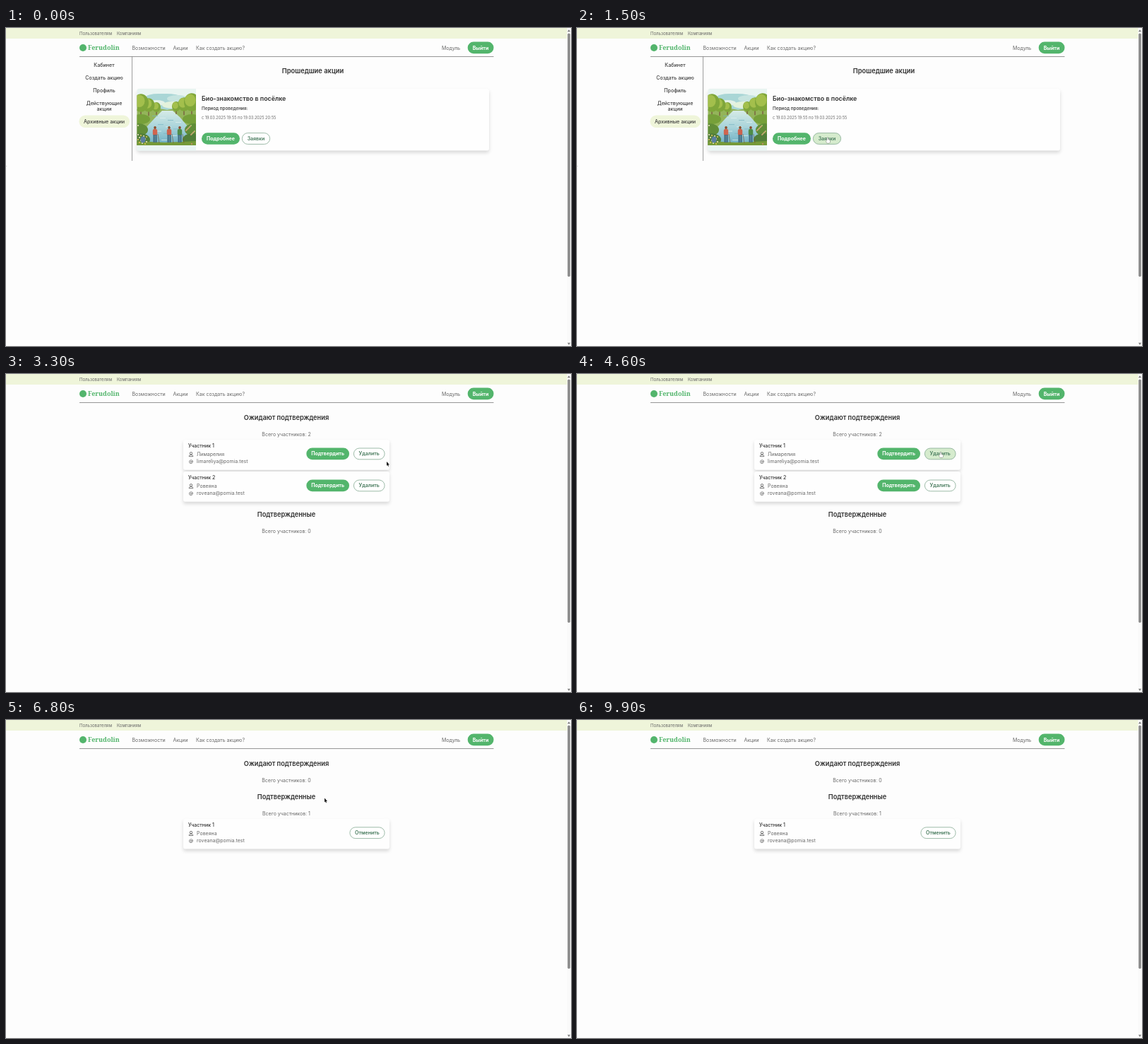
Write an HTML page with a canvas that moves like this. It is 800 px wide and 450 px high and loops after 10 s.

```html
<!DOCTYPE html>
<html lang="ru">
<head>
<meta charset="utf-8">
<title>Заявки участников</title>
<style>
html, body { margin: 0; width: 100%; height: 100%; overflow: hidden; background: #fdfdfd; }
canvas { display: block; width: 800px; height: 450px; }
</style>
</head>
<body>
<canvas id="stage" width="800" height="450"></canvas>
<script>
const ctx = document.getElementById('stage').getContext('2d');
const LOOP = 10000, STEP = 100;
const GREEN = '#53b56c', DARK = '#303030', GREY = '#686868';
const OPEN_LIST = 1700, REMOVE = 4900, CONFIRM = 6300;

const people = [
  { name: 'Лимарелия', mail: 'limareliya@pomia.test' },
  { name: 'Ровеяна', mail: 'roveana@pomia.test' }
];

// time, x, y of the mouse tip
const path = [
  [300, 515, 199], [800, 511, 196], [1100, 511, 196], [1500, 355, 155],
  [1900, 359, 154], [2400, 359, 154], [3100, 539, 124], [3500, 539, 124],
  [4200, 515, 110.5], [5200, 515, 110.5], [5800, 451, 110.5], [6800, 451, 110.5],
  [7500, 478, 245], [8300, 478, 245]
];

let mouse = null, overButton = false;

function mouseAt(t) {
  const i = path.findIndex(p => p[0] > t);
  if (i < 1) return null;
  const [t0, x0, y0] = path[i - 1], [t1, x1, y1] = path[i];
  const k = (t - t0) / (t1 - t0), e = k * k * (3 - 2 * k);
  return { x: x0 + (x1 - x0) * e, y: y0 + (y1 - y0) * e };
}

// y is the middle of the capitals
function text(s, x, y, size, weight = 400, color = GREY, align = 'left') {
  ctx.font = `${weight} ${size}px Inter, sans-serif`;
  ctx.fillStyle = color;
  ctx.textAlign = align;
  ctx.fillText(s, x, y + size * 0.36);
}

function rect(x, y, w, h, color) {
  ctx.fillStyle = color;
  ctx.fillRect(x, y, w, h);
}

function round(x, y, w, h, r, fill, stroke) {
  ctx.beginPath();
  ctx.roundRect(x, y, w, h, r);
  if (fill) { ctx.fillStyle = fill; ctx.fill(); }
  if (stroke) { ctx.strokeStyle = stroke; ctx.lineWidth = 0.8; ctx.stroke(); }
}

function oval(x, y, rx, ry, color) {
  ctx.fillStyle = color;
  ctx.beginPath();
  ctx.ellipse(x, y, rx, ry, 0, 0, Math.PI * 2);
  ctx.fill();
}

function poly(color, ...p) {
  ctx.fillStyle = color;
  ctx.beginPath();
  for (let i = 0; i < p.length; i += 2) ctx.lineTo(p[i], p[i + 1]);
  ctx.closePath();
  ctx.fill();
}

function button(label, x, y, w, solid) {
  const h = 16.6, top = y - h / 2;
  const hover = mouse && mouse.x > x && mouse.x < x + w && mouse.y > top && mouse.y < top + h;
  if (hover) overButton = true;
  if (solid) round(x, top, w, h, h / 2, GREEN);
  else round(x + 0.4, top + 0.4, w - 0.8, h - 0.8, h / 2, hover ? '#d5ebcd' : '#fff', '#84aa92');
  text(label, x + w / 2, y, 7, solid ? 700 : 600, solid ? '#fff' : '#45795b', 'center');
}

function card(x, y, w, h) {
  ctx.save();
  ctx.shadowColor = 'rgba(0,0,0,.15)';
  ctx.shadowBlur = 5;
  ctx.shadowOffsetY = 3;
  round(x, y, w, h, 3, '#fefefe');
  ctx.restore();
}

function chrome() {
  rect(0, 0, 800, 450, '#fdfdfd');
  rect(0, 0, 795, 15, '#eff5da');
  text('Пользователям', 104, 7.6, 6.05);
  text('Компаниям', 157, 7.6, 6.05);

  oval(109, 28, 5, 5, GREEN);
  ctx.font = '700 9px "Noto Serif", serif';
  ctx.textAlign = 'left';
  ctx.fillText('Ferudolin', 116, 31.2);

  text('Возможности', 178.5, 28, 7);
  text('Акции', 236.5, 28, 7);
  text('Как создать акцию?', 269, 28, 7);
  text('Модуль', 617, 28, 7);
  round(653.7, 19.6, 36.8, 16.6, 8.3, GREEN);
  text('Выйти', 672, 28, 7, 700, '#fff', 'center');
  rect(104, 40, 586.5, 0.9, '#8b8b8b');

  rect(794.5, 0, 5.5, 450, '#fafafa');
  round(795.2, 7.5, 3.6, 344.5, 1.8, '#8a8a8a');
  poly('#777', 795, 5.2, 799, 5.2, 797, 2.2);
  poly('#777', 795, 445.4, 799, 445.4, 797, 448.4);
}

function tree(x, y, r) {
  rect(x - 0.8, y + r, 1.6, r * 0.8, '#7d6a42');
  oval(x, y, r, r * 1.15, '#7fa63a');
  oval(x - r * 0.2, y - r * 0.25, r * 0.7, r * 0.8, '#a3bf4c');
}

function angler(x, y, shirt) {
  ctx.strokeStyle = '#76572f';
  ctx.lineWidth = 0.6;
  ctx.beginPath();
  ctx.moveTo(x + 4, y + 9);
  ctx.lineTo(x + 6, y + 22);
  ctx.stroke();
  oval(x, y, 1.8, 2, '#8a4b2b');
  round(x - 3.2, y + 2, 6.4, 9, 2, shirt);
  rect(x - 2.5, y + 10, 2.2, 11, '#416b80');
  rect(x + 0.4, y + 10, 2.2, 11, '#416b80');
}

function riverScene() {
  ctx.save();
  ctx.beginPath();
  ctx.roundRect(185.5, 86, 83.5, 80, [3, 0, 0, 0]);
  ctx.clip();
  rect(185, 86, 84, 80, '#e8f4f1');
  oval(227, 108, 36, 15, '#a9d6d6');
  oval(216, 98, 18, 5, '#a9d6d6');
  oval(243, 100, 15, 5, '#c6e4e0');
  oval(213, 106, 12, 4, '#e3f2e8');
  oval(236, 109, 15, 5, '#e3f2dc');
  poly('#93b45a', 185, 115, 212, 113, 228, 116, 245, 113, 269, 115, 269, 166, 185, 166);

  const water = ctx.createLinearGradient(0, 117, 0, 164);
  water.addColorStop(0, '#d6ebe6');
  water.addColorStop(0.5, '#a8d3da');
  water.addColorStop(1, '#6fb0c4');
  poly(water, 221, 117, 236, 117, 246, 126, 258, 140, 264, 166, 190, 166, 199, 140, 212, 126);
  for (let i = 0; i < 12; i++) {
    rect(207 + i * 11 % 36, 124 + i * 3.1, 8, 0.7, i % 2 ? '#e4f3ef' : '#78b4c2');
  }

  for (let i = 2; i >= 0; i--) {
    const r = 11 - i * 2.5;
    tree(191 + i * 11, 106 + i * 3, r);
    tree(263 - i * 11, 105 + i * 3, r);
  }
  oval(191, 129, 13, 7, '#76a03a');
  oval(263, 129, 13, 7, '#76a03a');
  oval(188, 144, 13, 9, '#618d38');
  oval(266, 144, 13, 9, '#618d38');
  oval(191, 158, 13, 9, '#527f3a');
  oval(263, 158, 13, 9, '#527f3a');
  poly('#759a38', 185, 160, 202, 161, 225, 162, 250, 161, 269, 160, 269, 166, 185, 166);
  for (let i = 0; i < 30; i++) {
    const x = i % 2 ? 255 + i * 7 % 13 : 187 + i * 5 % 14;
    oval(x, 138 + i * 13 % 27, 1, 1, ['#f5e9c5', '#d98a72', '#e6c35a', '#b0cb70'][i % 4]);
  }
  oval(194, 158, 3.5, 4.5, '#5b7fa0');
  angler(211, 141, '#d0654e');
  angler(231, 141, '#cc624d');
  angler(246, 141, '#4f8c48');
  ctx.restore();
}

function archivePage() {
  rect(178.2, 40, 0.8, 148, '#858585');
  round(103.5, 123.5, 71.5, 17.5, 8.7, '#eff5da');
  const side = (s, y) => text(s, 139, y, 7.1, 500, '#3c3c3c', 'center');
  side('Кабинет', 52.5);
  side('Создать акцию', 70.5);
  side('Профиль', 88.5);
  side('Действующие', 106.5);
  side('акции', 114.5);
  side('Архивные акции', 132.3);
  text('.', 0, 194, 6);

  text('Прошедшие акции', 434.5, 60.4, 9.35, 600, DARK, 'center');
  card(185.5, 86, 498.5, 87.5);
  rect(185.5, 165, 83.5, 8.5, '#eaf5f3');
  riverScene();
  text('Био-знакомство в посёлке', 277, 99.3, 8.9, 600, DARK);
  text('Период проведения:', 277, 113.3, 6.3, 600, '#4a4a4a');
  text('с 19.03.2025 19:55 по 19.03.2025 20:55', 277, 127.2, 5.6);
  button('Подробнее', 277, 156.5, 54, true);
  button('Заявки', 334, 156.5, 40);
}

function personIcon(x, y) {
  ctx.strokeStyle = '#555';
  ctx.lineWidth = 0.8;
  ctx.beginPath();
  ctx.arc(x, y - 1.4, 1.7, 0, Math.PI * 2);
  ctx.moveTo(x - 2.8, y + 3);
  ctx.bezierCurveTo(x - 2.8, y - 0.2, x + 2.8, y - 0.2, x + 2.8, y + 3);
  ctx.closePath();
  ctx.stroke();
}

function member(person, number, y, confirmed) {
  card(251, y - 9, 292, 42.8);
  text('Участник ' + number, 258, y, 7, 500, DARK);
  personIcon(262, y + 11.8);
  text(person.name, 270, y + 11.8, 7);
  text('@', 262, y + 21.8, 6.3, 500, '#555', 'center');
  text(person.mail, 270, y + 21.8, 7);
  if (confirmed) {
    button('Отменить', 486.5, y + 11, 50);
  } else {
    button('Подтвердить', 425.3, y + 11, 60.7, true);
    button('Удалить', 492, y + 11, 44.5);
  }
}

function section(title, list, y, confirmed) {
  text(title, 397, y, 9.25, 600, DARK, 'center');
  text('Всего участников: ' + list.length, 397, y + 23.2, 7, 400, GREY, 'center');
  list.forEach((p, i) => member(p, i + 1, y + 39.8 + i * 45, confirmed));
}

function membersPage(t) {
  const waiting = t < REMOVE ? people : t < CONFIRM ? [people[1]] : [];
  const accepted = t < CONFIRM ? [] : [people[1]];
  section('Ожидают подтверждения', waiting, 62.1, false);
  section('Подтвержденные', accepted, 108.9 + waiting.length * 45, true);
}

function drawMouse() {
  if (!mouse) return;
  ctx.save();
  ctx.translate(mouse.x, mouse.y);
  ctx.lineWidth = 0.7;
  ctx.beginPath();
  if (overButton) {
    ctx.roundRect(-0.7, 0, 1.5, 5, 0.7);
    ctx.roundRect(-1.8, 3.2, 5, 4.6, 1.4);
    ctx.strokeStyle = '#444';
    ctx.stroke();
    ctx.fillStyle = '#fff';
  } else {
    [[0, 0], [0, 5.8], [1.2, 4.7], [2.1, 6.8], [3, 6.4], [2.2, 4.4], [3.9, 4.2]]
      .forEach(p => ctx.lineTo(...p));
    ctx.closePath();
    ctx.strokeStyle = '#fff';
    ctx.stroke();
    ctx.fillStyle = '#111';
  }
  ctx.fill();
  ctx.restore();
}

function draw(now) {
  const t = Math.floor(now % LOOP / STEP) * STEP;
  mouse = mouseAt(t);
  overButton = false;
  chrome();
  if (t < OPEN_LIST) archivePage();
  else membersPage(t);
  drawMouse();
}

const start = performance.now();
function frame() {
  draw(performance.now() - start);
  requestAnimationFrame(frame);
}
frame();
</script>
</body>
</html>
```
